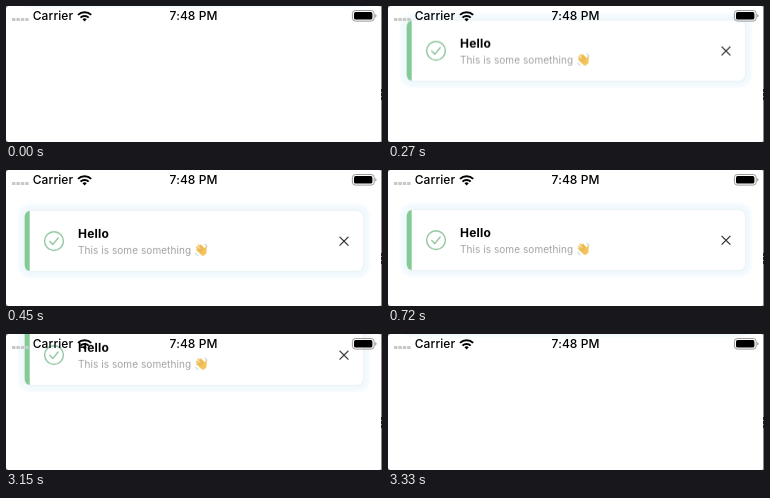
Recreate the animation shown at these times as an HTML page. Size 376 by 136 pixels, loop 3.42 s.

```html
<!DOCTYPE html>
<html lang="en">
<head>
<meta charset="utf-8">
<title>Toast</title>
<style>
  html, body { margin: 0; width: 100%; height: 100%; overflow: hidden; background: #fff; }
  #stage { position: relative; width: 376px; height: 136px; overflow: hidden; background: #fff; }
  svg { position: absolute; left: 0; top: 0; overflow: visible; }
  text { font-family: Inter, Roboto, sans-serif; }
  #toast { position: absolute; left: 0; top: 0; width: 376px; height: 60px; will-change: transform; }
  #card {
    position: absolute; left: 19px; top: 0; width: 338px; height: 60px;
    background: #fff; border-radius: 6px;
    box-shadow: 0 0 3px rgba(70, 80, 95, .11), 0 0 3px 7px #f3fafe;
  }
</style>
</head>
<body>
<div id="stage">
  <div id="toast">
    <div id="card"></div>
    <svg width="376" height="60" fill="none">
      <path d="M23.7 0V60a5 6 0 0 1-5-6V6a5 6 0 0 1 5-6z" fill="#83ca95"/>
      <g stroke="#92c7a2" stroke-width="1.4" stroke-linecap="round" stroke-linejoin="round">
        <circle cx="48" cy="30.1" r="9.4"/>
        <path d="M43.8 30.6l3 3 5.4-6.6"/>
      </g>
      <text x="72" y="26.8" font-size="12" font-weight="700" letter-spacing=".2" fill="#000">Hello</text>
      <text x="72" y="42.6" font-size="10" letter-spacing=".07" fill="#a2a2a2">This is some something</text>
      <g transform="translate(189 32.6) scale(.96)" stroke="#f4c35c" stroke-linecap="round">
        <path d="M4.2 7.2L8 3.8l3.2 3.4c1.2 2.6-.8 5.4-3.4 5z" fill="#f4c35c" stroke-width="1"/>
        <path d="M2 6.6l4.6 4.2M1.9 3.9l5.6 5M3.5 1.9l5.6 5.5M6 1.8l4.2 4.8M11 7.2l.5-3.4" stroke-width="1.8"/>
        <path d="M3.2 6l3 2.8M4.3 4.4l3 2.8M6 3.1l2.8 3.2" stroke="#c98a35" stroke-width=".4"/>
        <path d="M10.2 .6q2 .4 2.4 2.3M.7 10q.4 1.9 2.5 2.4" stroke="#9fb0bd" stroke-width=".7"/>
      </g>
      <path d="M333.6 25.8l8.8 8.8m0-8.8l-8.8 8.8" stroke="#222" stroke-width="1.1"/>
    </svg>
  </div>

  <svg width="376" height="136" fill="none">
    <path d="M6 13.4H23" stroke="#c8c8c8" stroke-width="3" stroke-dasharray="3.4 1"/>
    <g font-size="12" font-weight="450" fill="#000">
      <text x="26.7" y="14.2" letter-spacing=".1">Carrier</text>
      <text x="163.6" y="14.2" letter-spacing=".1">7:48 PM</text>
    </g>
    <g stroke="#000" stroke-width="2">
      <path d="M72 8.9a9.4 9.4 0 0 1 13.2 0M74.5 11.6a5.8 5.8 0 0 1 8.2 0"/>
      <path d="M78.6 15.4l-2.1-2.2a3 3 0 0 1 4.2 0z" fill="#000" stroke="none"/>
    </g>
    <rect x="346.4" y="4.5" width="21.8" height="10.6" rx="3" stroke="#999"/>
    <rect x="348" y="6.1" width="18.4" height="7.4" rx="1.6" fill="#000"/>
    <path d="M369.2 8.2q1.4.4 1.4 1.6t-1.4 1.6z" fill="#999"/>
    <path d="M375.5 0V136" stroke="#888"/>
    <path d="M375.5 83V94" stroke="#222" stroke-dasharray="3 1"/>
    <path d="M0 0h2L0 2zM376 0h-2l2 2zM0 136h2l-2-2zM376 136h-2l2-2z" fill="#888"/>
  </svg>
</div>
<script>
  const LOOP = 3420, STEP = 30;
  const SHOW = 116, HIDE = 3055;
  const HIDDEN = -65, SHOWN = 40;
  const STIFFNESS = 230.2, DAMPING = 25;

  const decay = DAMPING / 2;
  const freq = Math.sqrt(STIFFNESS - decay * decay);
  const toast = document.getElementById('toast');

  // Underdamped spring from 0 to 1, time in ms
  function spring(ms) {
    if (ms <= 0) return 0;
    const t = ms / 1000;
    return 1 - Math.exp(-decay * t) * (Math.cos(freq * t) + decay / freq * Math.sin(freq * t));
  }

  function draw(now) {
    const t = Math.floor((now % LOOP) / STEP) * STEP;
    const shown = spring(t - SHOW) - spring(t - HIDE);
    const y = HIDDEN + (SHOWN - HIDDEN) * shown;
    toast.style.transform = `translateY(${y.toFixed(2)}px)`;
  }

  const start = performance.now();
  function tick() {
    draw(performance.now() - start);
    requestAnimationFrame(tick);
  }
  tick();
</script>
</body>
</html>
```
